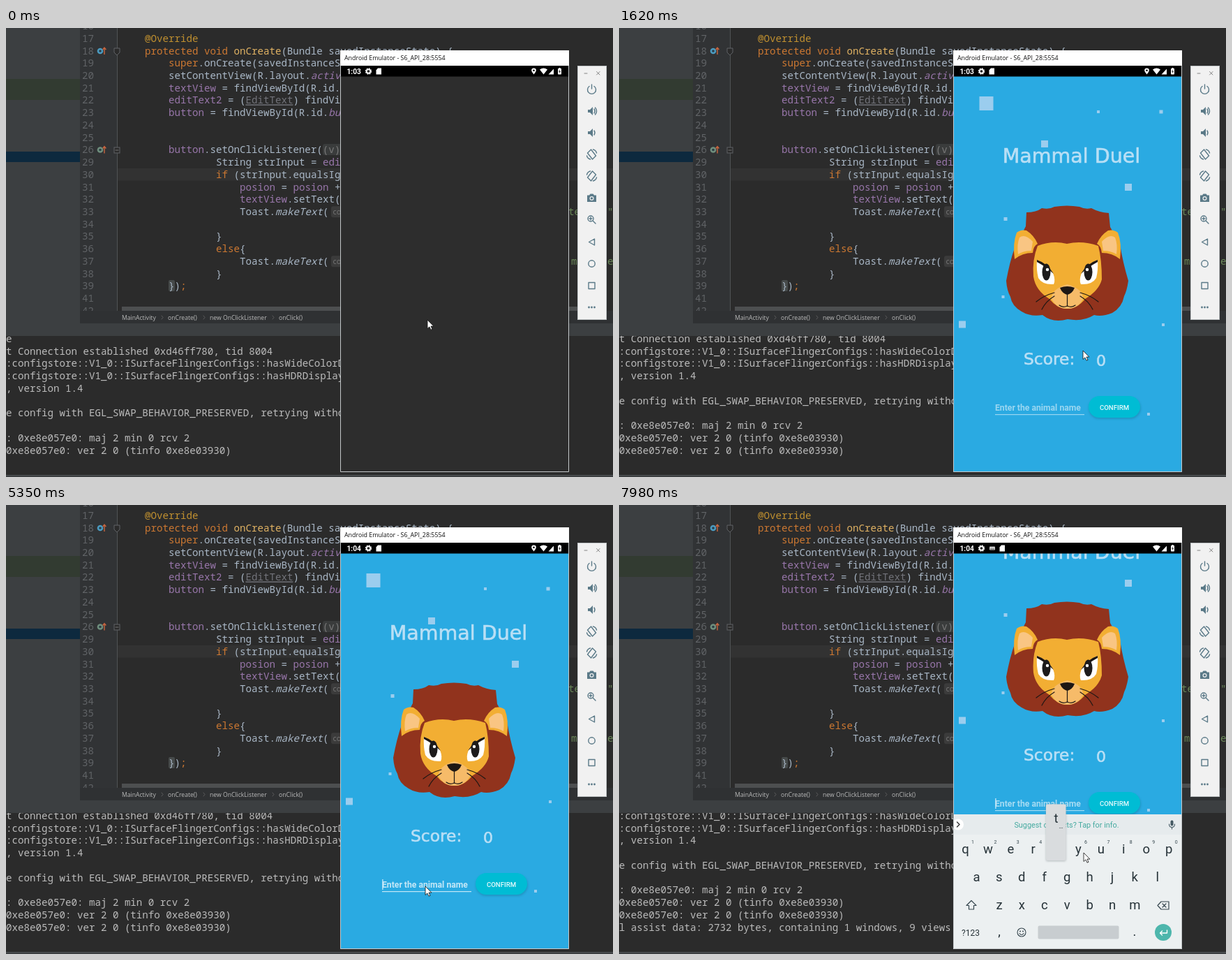
Write an HTML page that moves like this. It is 870 px wide and 643 px high and loops after 8000 ms.

```html
<!DOCTYPE html>
<html lang="en">
<head>
<meta charset="utf-8">
<title>Emulator session</title>
<style>
html, body { margin: 0; width: 100%; height: 100%; overflow: hidden; background: #2b2b2b; }
svg { display: block; width: 100vw; height: 100vh; }
text { white-space: pre; }
.mono { font: 14.17px "Noto Sans Mono", monospace; fill: #a9b7c6; }
.log { fill: #bbb; }
.num { fill: #606366; text-anchor: end; }
.ui { font: 8.65px "Open Sans", sans-serif; fill: #bbb; }
.k { fill: #cc7832; } .a { fill: #c09030; } .m { fill: #e0b263; }
.f { fill: #9876aa; } .s { fill: #6a8759; } .i { font-style: italic; }
.p { fill: #9876aa; font-style: italic; }
.g { fill: #787878; } .u { fill: #72737a; text-decoration: underline; }
.rb { font-family: Roboto, sans-serif; }
.mid { text-anchor: middle; }
.game { font-family: "DejaVu Sans", sans-serif; fill: #b9dff5; stroke: #b9dff5; stroke-width: .6; }
.line { fill: none; stroke: #5b7a88; stroke-width: 1.4; stroke-linejoin: round; stroke-linecap: round; }
.key { fill: #263238; }
</style>
</head>
<body>
<svg id="stage" viewBox="0 0 870 643" preserveAspectRatio="none"></svg>
<script>
const rect = (x, y, w, h, fill, more = '') =>
  `<rect x="${x}" y="${y}" width="${w}" height="${h}" fill="${fill}" ${more}/>`;
const circle = (x, y, r, fill, more = '') => `<circle cx="${x}" cy="${y}" r="${r}" fill="${fill}" ${more}/>`;
const path = (d, fill, more = '') => `<path d="${d}" fill="${fill}" ${more}/>`;
const line = (d, more = '') => `<path class="line" d="${d}" ${more}/>`;
const text = (x, y, cls, s, more = '') => `<text x="${x}" y="${y}" class="${cls}" ${more}>${s}</text>`;
const mirror = s => s + `<g transform="translate(1285 0) scale(-1 1)">${s}</g>`;
const paint = s => s.replace(/\{(\w)\|(.*?)\}/g, '<tspan class="$1">$2</tspan>');

const PITCH = 17.73;
const rowY = i => 19.8 + PITCH * i;

// [row, column, text]; {c|...} colours a run
const code = [
  [0, 4, '{a|@Override}'],
  [1, 4, '{k|protected void} {m|onCreate}(Bundle savedInstanceState) {'],
  [2, 8, '{k|super}.onCreate(savedInstanceState);'],
  [3, 8, 'setContentView(R.layout.{p|activity_main});'],
  [4, 8, '{f|textView} = findViewById(R.id.{p|text});'],
  [5, 8, '{f|editText2} = ({u|EditText}) findViewById('],
  [6, 8, '{f|button} = findViewById(R.id.{p|button});'],
  [9, 8, '{f|button}.setOnClickListener({g|(v)}'],
  [10, 16, 'String strInput = {f|editText2}'],
  [11, 16, '{k|if} (strInput.equalsIgnoreCase('],
  [12, 20, '{f|posion} = {f|posion} +'],
  [13, 20, '{f|textView}.setText('],
  [14, 20, 'Toast.{i|makeText}('],
  [16, 16, '}'],
  [17, 16, '{k|else}{'],
  [18, 20, 'Toast.{i|makeText}('],
  [19, 16, '}'],
  [20, 8, '{g|}}){k|;}'.replace('{g|}}', '}')]
];
const numbers = [16, 17, 18, 19, 20, 21, 22, 23, 24, 25, 26, 29, 30, 31, 32, 33, 34, 35, 36, 37, 38, 39, 41, 42];

const log = [
  'e',
  't Connection established 0xd46ff780, tid 8004',
  ':configstore::V1_0::ISurfaceFlingerConfigs::hasWideColorDisplay',
  ':configstore::V1_0::ISurfaceFlingerConfigs::hasHDRDisplay',
  ', version 1.4', '',
  'e config with EGL_SWAP_BEHAVIOR_PRESERVED, retrying without',
  '', ': 0xe8e057e0: maj 2 min 0 rcv 2',
  '0xe8e057e0: ver 2 0 (tinfo 0xe8e03930)',
  '0xe8e057e0: ver 2 0 (tinfo 0xe8e03930)',
  'l assist data: 2732 bytes, containing 1 windows, 9 views'
];

function editor() {
  const marker = (y, fill) =>
    circle(135, y, 4.3, fill) + circle(135, y, 1.8, '#2b3b45') +
    path(`M141 ${y + 5}V${y - 4}M138.6 ${y - 2}L141 ${y - 5}L143.4 ${y - 2}`, 'none', 'stroke="#c9653f" stroke-width="1.4"');
  const chip = i => rect(466, 7 + PITCH * i, 60, 16, '#3b3b3b', 'rx="3"') +
    text(468.5, 19 + PITCH * i, 'g', 'context:', 'font-family="Open Sans, sans-serif" font-size="11"');
  return rect(0, 0, 870, 643, '#2b2b2b') +
    rect(106, 0, 53, 405, '#313335') +
    rect(160, 201, 710, 17.5, '#323232') +
    rect(159, 0, 1, 405, '#505355') +
    numbers.map((n, i) => text(126, rowY(i - 1), 'mono num', n)).join('') +
    marker(33, '#4b9bc0') + marker(174.5, '#6f8f7d') +
    path('M155 29h8v6l-4 4l-4 -4z', '#2b2b2b', 'stroke="#606366"') +
    rect(155, 171, 8, 8, '#2b2b2b', 'stroke="#606366"') + line('M157 175h4', 'style="stroke:#777;stroke-width:1"') +
    rect(454, 166, 30, 16, '#3a3c3c', 'rx="3"') + rect(233, 361, 9, 16, '#464a4a', 'rx="2"') +
    code.map(([r, c, s]) => text(165 + c * 8.5, rowY(r), 'mono', paint(s))).join('') +
    chip(14) + chip(18) +
    text(806, rowY(14), 'mono s', 'te') + text(862, rowY(14), 'mono s', '"') +
    text(810, rowY(18), 'mono s', 'm') + text(862, rowY(18), 'mono s', 'e') +
    rect(166, 399, 653, 6, '#4d4f50') +
    rect(106, 405, 764, 18, '#2f3133') +
    [[166, 'MainActivity'], [232, 'onCreate()'], [292, 'new OnClickListener'], [391, 'onClick()']]
      .map(([x, s]) => text(x, 417.5, 'ui', s)).join('') +
    [223, 283, 382].map(x => line(`M${x} 412l2 2.5l-2 2.5`, 'style="stroke:#666;stroke-width:.8"')).join('') +
    rect(0, 0, 106, 423, '#3c3f41') + rect(0, 73, 106, 30, '#323b31') + rect(0, 177, 106, 15, '#0d293e') +
    rect(0, 423, 870, 18, '#3c3f41') +
    `<g clip-path="url(#logClip)"><g id="log">${log.map((s, i) =>
      text(0, 450 + PITCH * i, 'mono log', s)).join('')}</g></g>` +
    rect(0, 640, 870, 3, '#3c3f41') + rect(0, 640, 870, 1, '#505355');
}

function toolbar() {
  const x = 839.5, c = '#5b7a88';
  const speaker = y => path(`M834 ${y - 2}h3l4 -4v12l-4 -4h-3z`, c);
  const turn = (y, flip) => `<g transform="translate(${x} ${y}) scale(${flip} 1)">` +
    line('M-6 -2L-1 -7L6 2L1 7Z') + line('M2 -7q4 1 5 5M-2 7q-4 -1 -5 -5') + '</g>';
  return rect(819.5, 54.5, 41, 363, '#f1f1f1', 'stroke="#bfc3c5"') +
    line('M829 65h4M846.5 62.5l4.5 4.5M851 62.5l-4.5 4.5', 'style="stroke:#777;stroke-width:.9"') +
    line('M836 83.5a6 6 0 1 0 7 0M839.5 81v6') +
    speaker(119) + line('M843 116q2 3 0 6M844.5 114q4 5 0 10') +
    speaker(150) + line('M843 147q2 3 0 6') +
    turn(181, 1) + turn(212, -1) +
    path('M833 239.5h3l1.5 -2h4l1.5 2h3v9.500h-13z', c) + circle(x, 244, 3, '#f1f1f1') + circle(x, 244, 1.8, c) +
    circle(838, 273, 4, 'none', 'class="line"') + line('M841 276l4 4M836 273h4M838 271v4') +
    line('M843.5 302v9l-8 -4.500z') + circle(x, 337.5, 4.7, 'none', 'class="line"') + line('M835 364.500h9v9h-9z') +
    [-4, 0, 4].map(d => circle(x + d, 400, 1.4, c)).join('');
}

function lion() {
  const ink = 'stroke="#1d1714" stroke-width="1.2" stroke-linecap="round"';
  return path('M583 284L584 264Q598 264 606 258Q617 260 624 256Q642 253 660 256Q668 260 677 258Q688 264 702 265L704 285' +
      'L718 310Q722 335 730 362Q728 376 724 384Q721 400 707 408Q692 414 681 411Q665 421 643 417Q622 423 607 411' +
      'Q590 414 577 406Q563 398 561 385Q556 376 555 362Q560 335 567 315Z', '#91331d') +
    path('M600 312Q621 304 642 309Q664 304 687 312Q692 332 692 360Q688 376 668 388Q657 402 642 402Q628 402 617 388' +
      'Q597 376 594 356Q592 332 600 312Z', '#f2ae33') +
    mirror(path('M567 331Q564 308 570 293Q576 288 584 290Q595 297 600 309Q594 312 593 322Q578 322 567 331Z', '#f2ae33') +
      path('M572 324Q570 310 574 300Q582 294 593 306L591 319Q580 319 572 324Z', '#f9c583')) +
    path('M642.500 367Q666 374 665 388Q658 402 642.500 402Q627 402 620 388Q619 374 642.500 367Z', '#f6bb69') +
    mirror(path('M599 332Q614 339 622 351Q626 361 623 367Q607 368 601 358Q598 346 599 332Z', '#fff') +
      path('M599 332Q614 337 623 352Q612 342 599 335Z', '#1d1714') +
      `<ellipse cx="612.500" cy="349.500" rx="6" ry="12" fill="#1d1b1b"/>` +
      circle(614, 346, 2.2, '#fff') +
      path('M624 379Q609 383 598 392M624 384Q612 391 606 403M642.500 398Q636 401 631 397', 'none', ink)) +
    path('M632 372Q642.500 368 653 372Q650 380 642.500 382Q635 380 632 372Z', '#1d1714') +
    path('M642.500 381V398', 'none', ink);
}

function game() {
  const specks = [[517, 98, 20], [685, 118, 4], [774.500, 117.500, 5], [605, 161, 10], [725, 223, 10],
    [551.500, 271, 5], [548.500, 383, 4], [487, 419.500, 10], [778, 423, 4], [757, 551, 4]];
  specks[0] = [516.500, 98, 20];
  return rect(479, 69, 328, 700, '#2aaae2') +
    specks.map(([x, y, s]) => rect(x, y, s, s, '#9bcdee')).join('') +
    text(648.5, 193, 'game mid', 'Mammal Duel', 'font-size="28.500"') +
    lion() +
    text(580, 482, 'game', 'Score:', 'font-size="23.400"') + text(691, 484, 'game mid', '0', 'font-size="22"') +
    `<g id="field">${text(539, 548, 'rb', 'Enter the animal name', 'font-size="12.200" font-weight="700" fill="#fff"')}` +
    rect(539, 553, 128, 1.2, '#fff') + '</g>' +
    rect(539.3, 536, 1.2, 15, '#d8eefa', 'id="caret"') +
    rect(673, 529, 75, 31, '#1583a8', 'rx="15.500" opacity=".55" filter="url(#soft)"') +
    rect(673, 527, 74, 31, '#00bcd4', 'rx="15.500"') +
    text(710, 546.5, 'rb mid', 'CONFIRM', 'font-size="9.600" font-weight="500" fill="#e8fafc"');
}

function keyboard() {
  const step = 32.4;
  const row = (s, x, y) => [...s].map((c, i) => text(x + i * step, y, 'rb mid key', c, 'font-size="18.500"')).join('');
  return rect(479, 443, 328, 193, '#ecf0f1') + rect(479, 443, 328, 29, '#e6ebed') +
    circle(486, 457.5, 8, '#fff') + line('M484.500 454l3.500 3.500l-3.500 3.500', 'style="stroke:#333"') +
    text(641.5, 462, 'rb mid', 'Suggest contacts? Tap for info.', 'font-size="10.850" fill="#45aaa0"') +
    rect(790.5, 451.5, 4, 8, '#455a64', 'rx="2"') + line('M788.500 457q0 4.500 4 4.500t4 -4.500M792.500 462v2', 'style="stroke:#455a64;stroke-width:1.1"') +
    row('qwertyuiop', 496.5, 498.5) + row('asdfghjkl', 512.5, 538.5) + row('zxcvbnm', 545, 578.5) +
    [...'1234567890'].map((c, i) => text(507 + i * step, 485, 'rb mid', c, 'font-size="7" fill="#37474f"')).join('') +
    line('M505 566.500l7 7h-3.500v5.500h-7v-5.500h-3.500z', 'style="stroke:#37474f;stroke-width:1.2"') +
    line('M777 568h11v11h-11l-5 -5.500zM779 571l5 5M784 571l-5 5', 'style="stroke:#37474f;stroke-width:1.2"') +
    text(504, 616.5, 'rb mid key', '?123', 'font-size="12"') + row(',', 545, 617) + row('.', 739, 617) +
    circle(577, 612, 6, 'none', 'stroke="#37474f" stroke-width="1.100"') + circle(575, 610.5, 1, '#37474f') + circle(579, 610.5, 1, '#37474f') +
    line('M574 613.500q3 4 6 0', 'style="stroke:#37474f;stroke-width:1.1"') +
    rect(600.5, 602.5, 116, 19, '#c8cdd0', 'rx="2"') +
    circle(780, 612, 12, '#4db6ac') + line('M785.500 609v4h-10M778.500 610l-3 3l3 3', 'style="stroke:#fff"');
}

function phone() {
  const sd = path('M533 57.500h5v9h-7.500v-6z', '#fff', 'id="sd"');
  return rect(479, 32, 328, 604, '#2d2d2d') +
    `<g clip-path="url(#screen)"><g id="game">${game()}</g><g id="keys">${keyboard()}</g></g>` +
    rect(479, 32, 328, 22, '#fff') +
    text(485, 46, 'ui', 'Android Emulator - S6_API_28:5554', 'style="font-size:8.87px;fill:#111"') +
    rect(479, 54, 328, 15.5, '#000') +
    text(488.5, 65.7, 'rb', '', 'id="clock" font-size="10.200" font-weight="700" fill="#fff"') +
    circle(519.5, 62, 2.8, 'none', 'stroke="#fff" stroke-width="2"') +
    circle(519.5, 62, 4.1, 'none', 'stroke="#fff" stroke-width="1.200" stroke-dasharray="1.800 1.420"') + sd +
    `<g id="kbIcon">${rect(531, 59.5, 8, 5, '#ccc', 'rx=".8"')}${rect(532, 62.7, 6, .8, '#333')}</g>` +
    path('M756.500 66.500q-3.300 -4 -3.300 -5.700a3.300 3.300 0 0 1 6.600 0q0 1.700 -3.300 5.700z', '#fff', 'id="pin"') + circle(756.5, 60.8, 1.3, '#000') +
    path('M765 59.500q5.500 -3.800 11 0l-5.500 7z', '#fff') + path('M777.500 66.500h7.500v-8z', '#fff') +
    rect(791, 58, 5, 8.5, '#fff', 'rx=".8"') + rect(792.5, 57, 2, 1.5, '#fff') + path('M794 59.500l-2 3h1.500l-.5 2.500l2 -3h-1.500z', '#000') +
    path('M479.500 54V635.500H806.500V54', 'none', 'stroke="#c4c8ca" stroke-width="1"');
}

const popup = rect(612, 429, 28.5, 81, '#8d9599', 'rx="2" opacity=".6" filter="url(#soft)"') +
  rect(612, 428.5, 28.5, 80.5, '#d9dcde', 'rx="2"') +
  text(626.5, 455, 'rb mid key', 't', 'font-size="18.500"') + text(633.5, 463, 'rb mid key', '…', 'font-size="9"');

const stage = document.getElementById('stage');
stage.innerHTML = `<defs>
  <clipPath id="logClip"><rect x="0" y="441" width="870" height="199"/></clipPath>
  <clipPath id="screen"><rect x="479" y="69" width="328" height="567"/></clipPath>
  <filter id="soft" x="-30%" y="-30%" width="160%" height="160%"><feGaussianBlur stdDeviation="1.500"/></filter>
  </defs>${editor()}${phone()}${toolbar()}<g id="popup">${popup}</g>` +
  path('M0 0V12.500L2.900 9.900L5 14.200L7 13.300L5 9.100H8.900Z', '#fff', 'id="cursor" stroke="#111" stroke-width=".8"');

const $ = Object.fromEntries([...stage.querySelectorAll('[id]')].map(el => [el.id, el]));
const show = (el, on) => el.setAttribute('visibility', on ? 'visible' : 'hidden');
const move = (el, x, y) => el.setAttribute('transform', `translate(${x} ${y})`);

const bursts = [[90, 90, 1], [310, 610, 5], [1230, 1620, 6], [1870, 2630, 11], [2710, 3330, 9], [3480, 4260, 11],
  [4340, 4420, 2], [4570, 4570, 1], [4870, 4870, 1], [5350, 5680, 5], [5910, 6650, 11], [6730, 7500, 11],
  [7580, 7740, 3], [7980, 7980, 1]];
function snap(t) {
  let s = 0;
  for (const [a, b, n] of bursts) {
    if (t < a) break;
    const d = (b - a) / (n - 1) || 1;
    s = a + Math.min(n - 1, Math.floor((t - a) / d + .1)) * d;
  }
  return s;
}

// Pointer path: time, x, y
const route = [[0, 604, 418], [1155, 604, 418], [1460, 655, 455], [1545, 667, 466], [1620, 665, 462], [1800, 665, 462],
  [2300, 606, 537], [2630, 668, 478], [2860, 673, 420], [3172, 632, 187], [3330, 585, 133], [3405, 585, 133],
  [3850, 672, 380], [4260, 602, 527], [4420, 601, 545], [4570, 601, 547], [4870, 601, 546], [6130, 601, 546],
  [6580, 697, 524], [6650, 700, 522], [6810, 709, 519], [7500, 629, 500], [7740, 641, 507], [7980, 666, 498]];
function pointer(t) {
  const i = route.findIndex(p => p[0] > t);
  if (i < 0) return route.at(-1).slice(1);
  const [a, x, y] = route[i - 1], [b, u, v] = route[i], p = (t - a) / (b - a);
  return [x + (u - x) * p, y + (v - y) * p];
}

function draw(now) {
  const t = snap(now);
  const scroll = (t >= 90) + (t >= 5500);
  move($.log, 0, -PITCH * scroll);
  [...$.log.children].forEach((el, i) => show(el, i < 10 + scroll));

  $.game.setAttribute('opacity', t < 310 ? 0 : 1 - .6 * Math.max(0, (610 - t) / 300) ** 2);
  const p = Math.min(1, Math.max(0, (t - 5850) / 400));
  const up = 1 - (1 - p) ** 2;
  move($.game, 0, -116 * up);
  move($.keys, 0, 193 * (1 - up));

  $.clock.textContent = t < 3860 ? '1:03' : '1:04';
  show($.pin, t < 5500);
  show($.kbIcon, t >= 5910);
  move($.sd, t >= 5910 ? 15 : 0, 0);

  $.field.setAttribute('opacity', t < 5350 ? .52 : t < 5900 ? .72 : .58);
  show($.caret, t >= 5350 && Math.floor((Math.max(t, 5740) - 5740) / 500) % 2 === 0);
  show($.popup, t >= 7980);
  move($.cursor, ...pointer(t));
}

function tick(now) {
  draw(now % 8000);
  requestAnimationFrame(tick);
}
draw(0);
requestAnimationFrame(tick);
</script>
</body>
</html>
```
